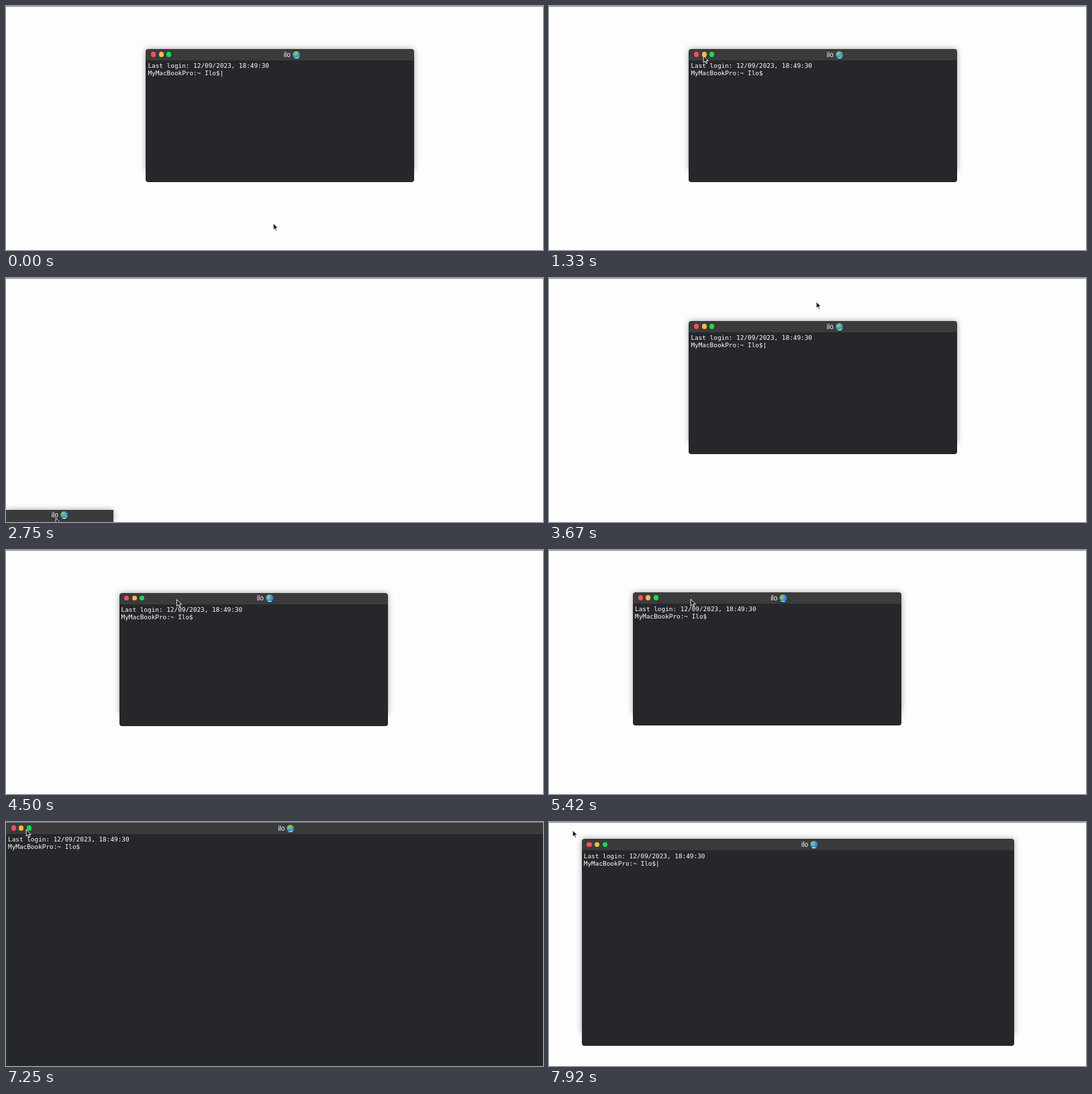
Write an HTML page that moves like this. It is 800x363 px and loops after 8000 ms.

```html
<!DOCTYPE html>
<html lang="en">
<head>
<meta charset="utf-8">
<title>Terminal window</title>
<style>
  html, body { margin: 0; width: 100%; height: 100%; overflow: hidden; }
  #stage { position: relative; width: 800px; height: 363px; overflow: hidden; background: #fefdfe; }
  #stage::after { content: ""; position: absolute; inset: 0 0 auto; height: 1px; background: #85838a; }
  #win { position: absolute; border-radius: 4px; box-shadow: 0 0 8px rgba(0, 0, 0, .36); }
  .bar {
    position: relative; display: flex; align-items: center; justify-content: center;
    box-sizing: border-box; height: 17px; padding-left: 35px;
    background: #3b3a3c; border-radius: 4px 4px 0 0;
    color: #fff; font: 10px/16px "Liberation Sans", Arial, sans-serif;
  }
  .dot { position: absolute; top: 4.4px; width: 7.2px; height: 7.2px; border-radius: 50%; }
  .globe { width: 11.6px; height: 11.6px; margin-left: 2.8px; }
  .body {
    box-sizing: border-box; height: 100%; padding: 2.3px 3px; overflow: hidden;
    background: #25272a; border-radius: 0 0 4px 4px;
    color: #fff; font: 9.4px/11px "DejaVu Sans Mono", monospace; white-space: pre;
  }
  .dock .bar { height: 100%; padding: 0; align-items: flex-start; }
  .dock .globe { margin-top: 2.2px; }
  .dock .dot, .dock .body { display: none; }
  #win.dock, .dock .bar, #win.full, .full .bar, .full .body { border-radius: 0; }
  #cursor { position: absolute; left: -1.1px; top: -1.1px; width: 10px; height: 14.4px; }
</style>
</head>
<body>
<div id="stage">
  <div id="win">
    <div class="bar">
      <i class="dot" style="left:7.6px;background:#f9505a"></i>
      <i class="dot" style="left:19.2px;background:#f8bd3c"></i>
      <i class="dot" style="left:30.8px;background:#0ee04e"></i>
      <span>ilo</span>
      <svg class="globe" viewBox="0 0 24 24">
        <defs>
          <radialGradient id="sea" cx=".35" cy=".3" r=".8">
            <stop offset="0" stop-color="#5cc4ff"/>
            <stop offset="1" stop-color="#1268c8"/>
          </radialGradient>
          <clipPath id="disc"><circle cx="12" cy="12" r="11.5"/></clipPath>
        </defs>
        <circle cx="12" cy="12" r="11.5" fill="url(#sea)"/>
        <g clip-path="url(#disc)" fill="#8bc53f">
          <path class="land" d="M2 5 9 0 15 3 11 8 8 13 4 12ZM13 14 19 13 20 18 15 19Z"/>
          <path class="land" d="M1 5 9 0 14 4 9 10 13 13 11 18 8 15 3 10Z"/>
          <path class="land" d="M2 3 13 0 18 6 14 12 10 9 8 14 3 10ZM14 16 20 15 21 19 16 20Z"/>
          <path fill="#eef7fa" d="M6 21 12 20 19 21V24H6Z"/>
        </g>
      </svg>
    </div>
    <div class="body">Last login: 12/09/2023, 18:49:30
MyMacBookPro:~ Ilo$<span id="caret">|</span></div>
  </div>
  <svg id="cursor" viewBox="-1 -1 9 13">
    <path d="M0 0V9L2.1 7.2 3.6 10.5 5 9.9 3.6 6.7H6.4Z" fill="#1d1d1f" stroke="#fff" stroke-width=".8"/>
  </svg>
</div>
<script>
  const LOOP = 8000;
  const byId = id => document.getElementById(id);
  const win = byId("win"), caret = byId("caret"), cursor = byId("cursor");
  const lands = document.querySelectorAll(".land");

  // Window boxes: left, top, width, height (without the bar)
  const HOME = [208.4, 64, 400, 181];
  const DOCK = [0, 345, 160, 18];
  const LEFT = [125, 63, 400, 181];
  const FULL = [0, 1, 800, 362];

  const moves = [
    { at: 1578, dur: 500, from: HOME, to: DOCK, mode: "dock", ease: cssEase },
    { at: 2765, dur: 500, from: DOCK, to: HOME, mode: "", ease: cssEase },
    { at: 4200, dur: 620, from: HOME, to: LEFT, mode: "", ease: smooth },
    { at: 5914, dur: 500, from: LEFT, to: FULL, mode: "full", ease: cssEase },
    { at: 7800, dur: 500, from: FULL, to: LEFT, mode: "", ease: cssEase }
  ];

  // Pointer stops: time, x, y
  const path = [
    [60, 398, 323], [420, 237, 80], [560, 237, 80], [1000, 230, 74],
    [1760, 230, 74], [2330, 72, 355], [2400, 72, 355], [2500, 74, 357],
    [2780, 74, 357], [3330, 385, 3], [3450, 385, 3], [3660, 398, 35],
    [3740, 398, 35], [4080, 294, 74], [4200, 294, 74], [4820, 211, 73],
    [5430, 211, 73], [5670, 159, 71], [5920, 159, 71], [6170, 144, 69.5],
    [6580, 30, 11], [7250, 30, 11], [7500, 35, 12]
  ];

  function smooth(p) { return p * p * (3 - 2 * p); }

  // cubic-bezier(.25, .1, .25, 1)
  function cssEase(p) {
    let lo = 0, hi = 1, s = .5;
    for (let i = 0; i < 24; i++) {
      s = (lo + hi) / 2;
      if (.75 * s * (1 - s) + s ** 3 < p) lo = s; else hi = s;
    }
    return .3 * s * (1 - s) ** 2 + 3 * s * s * (1 - s) + s ** 3;
  }

  const clamp = p => Math.min(1, Math.max(0, p));
  const mix = (a, b, p) => a.map((v, i) => v + (b[i] - v) * p);

  function pointerAt(t) {
    const next = path.findIndex(k => k[0] > t);
    if (next === 0) return path[0];
    if (next < 0) return path[path.length - 1];
    const a = path[next - 1], b = path[next];
    return mix(a, b, smooth((t - a[0]) / (b[0] - a[0])));
  }

  function draw(t) {
    const move = moves.filter(m => m.at <= t).pop();
    const box = move
      ? mix(move.from, move.to, move.ease(clamp((t - move.at) / move.dur)))
      : HOME;
    win.className = move ? move.mode : "";
    ["left", "top", "width", "height"].forEach((side, i) => win.style[side] = box[i] + "px");

    const blink = (t + 920) % 1000;
    caret.style.visibility = blink >= 500 ? "visible" : "hidden";

    const turn = Math.floor((t + 330) / 410) % 3;
    lands.forEach((land, i) => land.style.display = (i + 1) % 3 === turn ? "" : "none");

    const [, x, y] = pointerAt(t);
    cursor.style.transform = `translate(${x}px, ${y}px)`;
  }

  const start = performance.now();
  function tick() {
    draw((performance.now() - start) % LOOP);
    requestAnimationFrame(tick);
  }
  tick();
</script>
</body>
</html>
```
